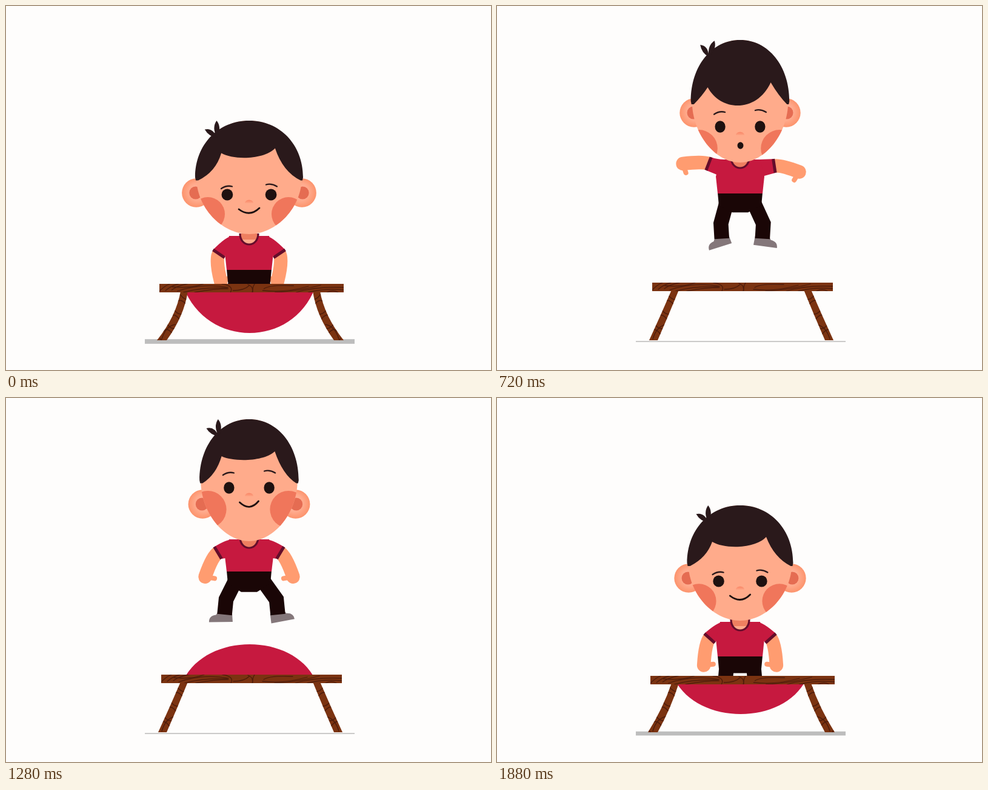
Recreate the animation shown at these times as an HTML page with a canvas. Size 800x600 px, loop 1920 ms.

```html
<!DOCTYPE html>
<html lang="en">
<head>
<meta charset="utf-8">
<title>Trampoline</title>
<style>
html, body { margin: 0; width: 100%; height: 100%; overflow: hidden; background: #fefdfc; }
canvas { display: block; }
</style>
</head>
<body>
<canvas id="stage" width="800" height="600"></canvas>
<script>
const ctx = document.getElementById('stage').getContext('2d');
const LOOP = 1920, JUMP = 960, STEP = 40, CX = 401;
const RED = '#c6193f', MAROON = '#650d2b', BLACK = '#1a0606', HAIR = '#2a191b';
const SKIN = '#ffab8b', ARM = '#ff9c70', CHEEK = '#f0765b', SHOE = '#84777a';
const WOOD = '#7b3311', GRAIN = '#4d1c0b';

// Smooth monotone interpolation through keys, repeating every jump.
const BEATS = [0, 80, 320, 480, 680, 720, 920];
function track(values, times = BEATS) {
  const n = values.length;
  const at = i => {
    const k = ((i % n) + n) % n;
    return [times[k] + Math.floor(i / n) * JUMP, values[k]];
  };
  const rate = i => {
    const [t0, v0] = at(i), [t1, v1] = at(i + 1);
    return (v1 - v0) / (t1 - t0);
  };
  const slope = i => {
    const a = rate(i - 1), b = rate(i);
    return a * b <= 0 ? 0 : 2 * a * b / (a + b);
  };
  return p => {
    let i = n - 1;
    while (times[i] > p) i--;
    const [t0, v0] = at(i), [t1, v1] = at(i + 1);
    const h = t1 - t0, u = (p - t0) / h, w = 1 - u;
    return v0 * w * w * (1 + 2 * u) + v1 * u * u * (3 - 2 * u)
      + h * u * w * (slope(i) * w - slope(i + 1) * u);
  };
}

const tracks = {
  waist: track([435, 367, 286, 276, 276, 298, 309, 368, 426],
    [0, 80, 320, 480, 560, 680, 720, 840, 920]),
  sag: track([75, 22, -64, -58, 21, 0, 0, 0, 57],
    [0, 80, 250, 320, 480, 640, 720, 850, 920]),
  squash: track([1, .7, 0, 0, 0, 0, .85]),
  chin: track([59, 52, 50, 47, 51, 51, 59]),
  headH: track([93.5, 94.5, 100.5, 102.5, 101.5, 101, 95]),
  ear: track([119, 123, 140, 133, 120, 120, 120]),
  eye: track([122, 119, 113, 133, 145, 143, 125]),
  brow: track([13, 18, 24, 24, 23.5, 23.5, 14]),
  fringe: track([49.5, 50, 57, 70, 75, 74, 56]),
  dip: track([11.5, 9, 10, 20, 34, 34, 12]),
  torso: track([56, 54, 53, 52, 55, 56, 57]),
  sleeve: track([34, 30, 59, 83, 108, 111, 42]),
  arm: track([-4, -3, 28, 54, 86, 90, 12]),
  knee: track([24, 24, 41.5, 44.5, 38, 35, 25]),
  ankle: track([25, 25.5, 44, 45, 35.5, 33.5, 25]),
  toeL: track([-4, -4, 2, 13, 18, 19, 4]),
  toeR: track([-4, -4, -9, 0, 9, 9, 0])
};

const rad = d => d * Math.PI / 180;

function poly(points, color) {
  ctx.beginPath();
  points.forEach(([x, y]) => ctx.lineTo(x, y));
  ctx.closePath();
  ctx.fillStyle = color;
  ctx.fill();
}
function oval(x, y, rx, ry, color) {
  ctx.beginPath();
  ctx.ellipse(x, y, rx, ry, 0, 0, 7);
  ctx.fillStyle = color;
  ctx.fill();
}
function bend(x0, y0, cx, cy, x1, y1, width, color, cap = 'round') {
  ctx.beginPath();
  ctx.moveTo(x0, y0);
  ctx.quadraticCurveTo(cx, cy, x1, y1);
  ctx.lineWidth = width;
  ctx.lineCap = cap;
  ctx.strokeStyle = color;
  ctx.stroke();
}

function drawGround(q) {
  const h = 1.8 + 5.8 * q;
  ctx.fillStyle = q > .3 ? '#bdbdbd' : '#c6c5c4';
  ctx.fillRect(229, 553 - h / 2, 346, h);
}

function drawMat(sag) {
  if (Math.abs(sag) < 1) return;
  const y = 464, tip = y + sag * 4 / 3;
  ctx.beginPath();
  ctx.moveTo(293, y);
  ctx.bezierCurveTo(332, tip, 472, tip, 510, y);
  ctx.fillStyle = RED;
  ctx.fill();
}

function drawFrameLeg(s, top, bow, foot) {
  const x = d => 403 + s * d;
  ctx.save();
  ctx.beginPath();
  ctx.moveTo(x(115), top);
  ctx.quadraticCurveTo(x(133.5 - bow), 511, x(152 + foot), 551);
  ctx.lineTo(x(138), 551);
  ctx.quadraticCurveTo(x(120.5 - bow), 511, x(103), top);
  ctx.fillStyle = WOOD;
  ctx.fill();
  ctx.clip();
  for (let i = 0; i < 7; i++) {
    const y = 477 + i * 12, m = 108 + i * 5.6 - bow / 2;
    bend(x(m - 5), y + 7, x(m + 6), y + (i % 2 ? -9 : 9), x(m + 13), y - 1, 1.4, GRAIN);
  }
  bend(x(124), 525, x(140), 528, x(146), 549, 1.4, GRAIN);
  ctx.restore();
}

function drawBoard(q, sag) {
  const k = Math.min(1, q * 1.4), half = 149 + 3 * k, top = 456 + 2 * k;
  const bow = Math.max(0, sag - 45) * .38;
  drawFrameLeg(-1, top + 12, bow, 2 * k);
  drawFrameLeg(1, top + 12, bow, 2 * k);
  ctx.save();
  ctx.translate(405, top);
  ctx.scale(half / 149, 1);
  ctx.beginPath();
  ctx.rect(-149, 0, 298, 14);
  ctx.fillStyle = WOOD;
  ctx.fill();
  ctx.clip();
  const line = (a, b, c, d, e, f) => bend(a, b, c, d, e, f, 1.3, GRAIN);
  for (let i = 0; i < 3; i++) {
    line(-149 + i * 10, 12 - i, -140 + i * 10, 3, -132 + i * 14, 0);
  }
  line(-120, 12, -80, -2, -38, 6);
  line(-110, 14, -78, 5, -40, 7);
  line(-92, 14, -62, 8, -38, 8);
  line(-128, 5, -98, 8, -78, 0);
  line(-48, 0, -28, 3, -34, 14);
  line(-30, 11, -12, 11, -4, 3);
  line(-6, 1, 4, 5, 1, 14);
  line(5, 0, 1, 6, 2, 13);
  line(18, 11, 55, 15, 92, 4);
  line(20, 8, 30, 1, 68, 3);
  line(38, 14, 78, 12, 112, 2);
  line(72, 14, 105, 4, 149, 6);
  line(92, 14, 118, 7, 149, 10);
  line(122, 14, 132, 9, 140, 14);
  ctx.restore();
}

function drawArm(s, p, top) {
  const high = Math.max(0, p.sleeve - 60);
  const a = s > 0 ? p.sleeve - Math.max(0, p.sleeve - 80) * .4 : p.sleeve;
  const b = s > 0 ? p.arm * (1 - Math.max(0, p.arm - 30) * .0025) : p.arm;
  const ax = s * Math.sin(rad(a)), ay = Math.cos(rad(a));
  const bx = s * Math.sin(rad(b)), by = Math.cos(rad(b));
  const x = CX + s * (49.7 + .06 * (a - 30)) + high * .05;
  const y = top + 30.5 - .29 * (a - 30);
  const len = 46 - Math.max(0, p.arm) * .04;
  const hx = x + bx * len, hy = y + by * len;

  // thumb, forearm, sleeve, cuff
  const tx = hx - s * by * 15 - bx * 5, ty = hy + s * bx * 15 - by * 5;
  bend(hx, hy, (hx + tx) / 2, (hy + ty) / 2, tx, ty, 8, ARM);
  bend(x, y, x + ax * 11, y + ay * 11, hx, hy, 22.5, ARM);

  const ox = s * ay * 11.5, oy = -s * ax * 11.5;
  ctx.beginPath();
  ctx.moveTo(CX, top);
  ctx.lineTo(CX + s * 27, top);
  ctx.quadraticCurveTo(CX + s * 37, top, x + ox, y + oy);
  ctx.lineTo(x - ox, y - oy);
  ctx.lineTo(CX + s * 39, top + 31 - Math.max(0, a - 80) * .2);
  ctx.lineTo(CX, top + 40);
  ctx.fillStyle = RED;
  ctx.fill();
  bend(x + ox, y + oy, x, y, x - ox, y - oy, 5, MAROON, 'butt');
}

function drawLeg(s, p) {
  const w = p.waist, lean = s * 3.5 * Math.max(0, Math.min(1, (p.ankle - 25) / 9));
  const kx = CX + s * (p.knee + lean), ax = CX + s * (p.ankle + lean);
  const drop = Math.max(0, p.dip - 20) * .25, ay = w + 71 + drop;
  ctx.save();
  ctx.translate(ax, ay);
  ctx.rotate(rad(s < 0 ? -p.toeL : p.toeR));
  ctx.scale(s, 1);
  ctx.beginPath();
  ctx.moveTo(-12.5, -3);
  ctx.lineTo(-13, 12.5);
  ctx.lineTo(26, 11.5);
  ctx.quadraticCurveTo(26, 1, 14, 0);
  ctx.lineTo(12, -3);
  ctx.fillStyle = SHOE;
  ctx.fill();
  ctx.restore();

  ctx.beginPath();
  ctx.moveTo(CX + s * 22, w + 14);
  ctx.lineTo(kx, w + 46 + drop);
  ctx.lineTo(ax, ay);
  ctx.lineWidth = 24.5;
  ctx.lineCap = 'butt';
  ctx.lineJoin = 'miter';
  ctx.strokeStyle = BLACK;
  ctx.stroke();
}

function drawBody(p) {
  const w = p.waist, top = w - p.torso;
  for (const s of [-1, 1]) drawArm(s, p, top);
  for (const s of [-1, 1]) drawLeg(s, p);
  const crotch = w + 27 + (p.knee - 24) * .38;
  poly([[CX - 37, w - 1], [CX - 35, w + 20], [CX - 13, crotch],
    [CX + 13, crotch], [CX + 35, w + 20], [CX + 37, w - 1]], BLACK);
  poly([[CX - 33, top], [CX + 33, top], [CX + 40, top + 28],
    [CX + 37, w], [CX - 37, w], [CX - 40, top + 28]], RED);

  // neck and collar
  ctx.beginPath();
  ctx.moveTo(CX - 15, top - 4);
  ctx.bezierCurveTo(CX - 15, top + 20, CX + 15, top + 20, CX + 15, top - 4);
  ctx.fillStyle = SKIN;
  ctx.fill();
  ctx.save();
  ctx.clip();
  ctx.fillStyle = '#ee7f60';
  ctx.fillRect(CX - 16, top - 5, 32, w - p.chin - top + 14);
  ctx.restore();
  ctx.lineWidth = 3.2;
  ctx.strokeStyle = MAROON;
  ctx.stroke();
}

function drawTuft(x, y, turn) {
  ctx.save();
  ctx.translate(x, y);
  ctx.rotate(rad(turn));
  ctx.fillStyle = HAIR;
  for (const [tx, ty] of [[-20, -9], [0, -23]]) {
    ctx.beginPath();
    ctx.moveTo(0, 5);
    ctx.quadraticCurveTo(tx / 2 - ty * .38, ty / 2 + tx * .38, tx, ty);
    ctx.quadraticCurveTo(tx / 2 + ty * .38, ty / 2 - tx * .38, 0, 5);
    ctx.fill();
  }
  ctx.restore();
}

// Half of the head outline, full at the crown and narrower at the chin.
function halfHead(cy, W, H, dir, k) {
  const v = k * H * dir, h = k * W, tip = cy + dir * H;
  ctx.bezierCurveTo(CX + dir * W, cy + v, CX + dir * h, tip, CX, tip);
  ctx.bezierCurveTo(CX - dir * h, tip, CX - dir * W, cy + v, CX - dir * W, cy);
}

function drawHead(p, gasp) {
  const H = p.headH, W = 88 - (H - 93.5) * 1.03;
  const cy = p.waist - p.chin - H, top = cy - H, slim = 88 - W;
  const eyeY = top + p.eye, earY = top + p.ear;

  for (const s of [-1, 1]) {
    const x = CX + s * (87.2 - slim * 1.45);
    const g = ctx.createRadialGradient(x - s * 5, earY - 3, 4, x, earY, 25);
    g.addColorStop(0, '#ffb59e');
    g.addColorStop(.5, '#ffaa8c');
    g.addColorStop(1, '#fc9169');
    oval(x, earY, 23.7, 23.8, g);
    oval(x + s, earY, 10.5, 10.5, '#e56c52');
  }

  ctx.save();
  ctx.beginPath();
  ctx.moveTo(CX + W - 1, cy);
  halfHead(cy, W - 1, H, 1, .525);
  halfHead(cy, W - 1, H, -1, .575);
  ctx.fillStyle = SKIN;
  ctx.fill();
  ctx.clip();
  const r = 28 + slim * .36, cheekY = eyeY + 32 + slim * .5;
  oval(CX - 68, cheekY, r, r, CHEEK);
  oval(CX + 65, cheekY, r, r, CHEEK);
  ctx.restore();

  // hair cap with a fringe
  const px = 43 + .34 * (p.dip - 9), fy = top + p.fringe, cap = W + 1;
  ctx.beginPath();
  ctx.moveTo(CX - cap, cy);
  halfHead(cy, cap, H, -1, .575);
  ctx.lineTo(CX + W, cy + 5);
  ctx.lineTo(CX + W - 3, cy + 5);
  ctx.quadraticCurveTo(CX + px + 12, cy - 9, CX + px - 1, fy - 4);
  const low = fy + p.dip * 4 / 3;
  ctx.bezierCurveTo(CX + px * .55, low, CX - px * .6, low, CX - px - 2, fy + 4);
  ctx.quadraticCurveTo(CX - px - 11, cy - 9, CX - W + 4, cy + 5);
  ctx.lineTo(CX - W, cy + 5);
  ctx.fillStyle = HAIR;
  ctx.fill();
  drawTuft(CX - 53 + slim * .4, top + 23, (p.dip - 13) * .92);

  const ex = W * .41;
  for (const s of [-1, 1]) {
    oval(CX + s * ex, eyeY, 9.4 - slim * .1, 9.4 + slim * .06, '#1e1110');
    const x = CX + s * (37 - slim * .4), y = eyeY - p.brow - (s > 0 ? 3 : 0);
    bend(x - 9, y + (s < 0 ? 3 : -.5), x, y - 3, x + 9, y + (s < 0 ? -.5 : 2.5), 2.3, HAIR);
  }

  const noseY = eyeY + 14;
  const g = ctx.createLinearGradient(0, noseY - 5, 0, noseY + 1);
  g.addColorStop(0, '#f98767');
  g.addColorStop(1, SKIN);
  ctx.beginPath();
  ctx.ellipse(CX, noseY, 7, 5.5, 0, Math.PI, Math.PI * 2);
  ctx.fillStyle = g;
  ctx.fill();

  if (gasp) {
    oval(CX + .5, eyeY + 31, 5, 5.8, '#1e1110');
  } else {
    const m = 17 - slim * .2, y = eyeY + 23;
    bend(CX - m, y + 1, CX + 1, y + 14.5 + slim * .3, CX + m, y - 1, 2.8, '#1e1110');
  }
}

function draw(time) {
  const p = {};
  for (const name in tracks) p[name] = tracks[name](time % JUMP);
  ctx.fillStyle = '#fefdfc';
  ctx.fillRect(0, 0, 800, 600);
  drawGround(p.squash);
  drawMat(p.sag);
  ctx.save();
  ctx.beginPath();
  ctx.rect(0, 0, 800, 461);
  ctx.clip();
  drawBody(p);
  drawHead(p, time >= 200 && time < 880);
  ctx.restore();
  drawBoard(p.squash, p.sag);
}

const start = performance.now();
function tick() {
  const t = (performance.now() - start) % LOOP;
  draw(Math.floor(t / STEP) * STEP);
  requestAnimationFrame(tick);
}
tick();
</script>
</body>
</html>
```
